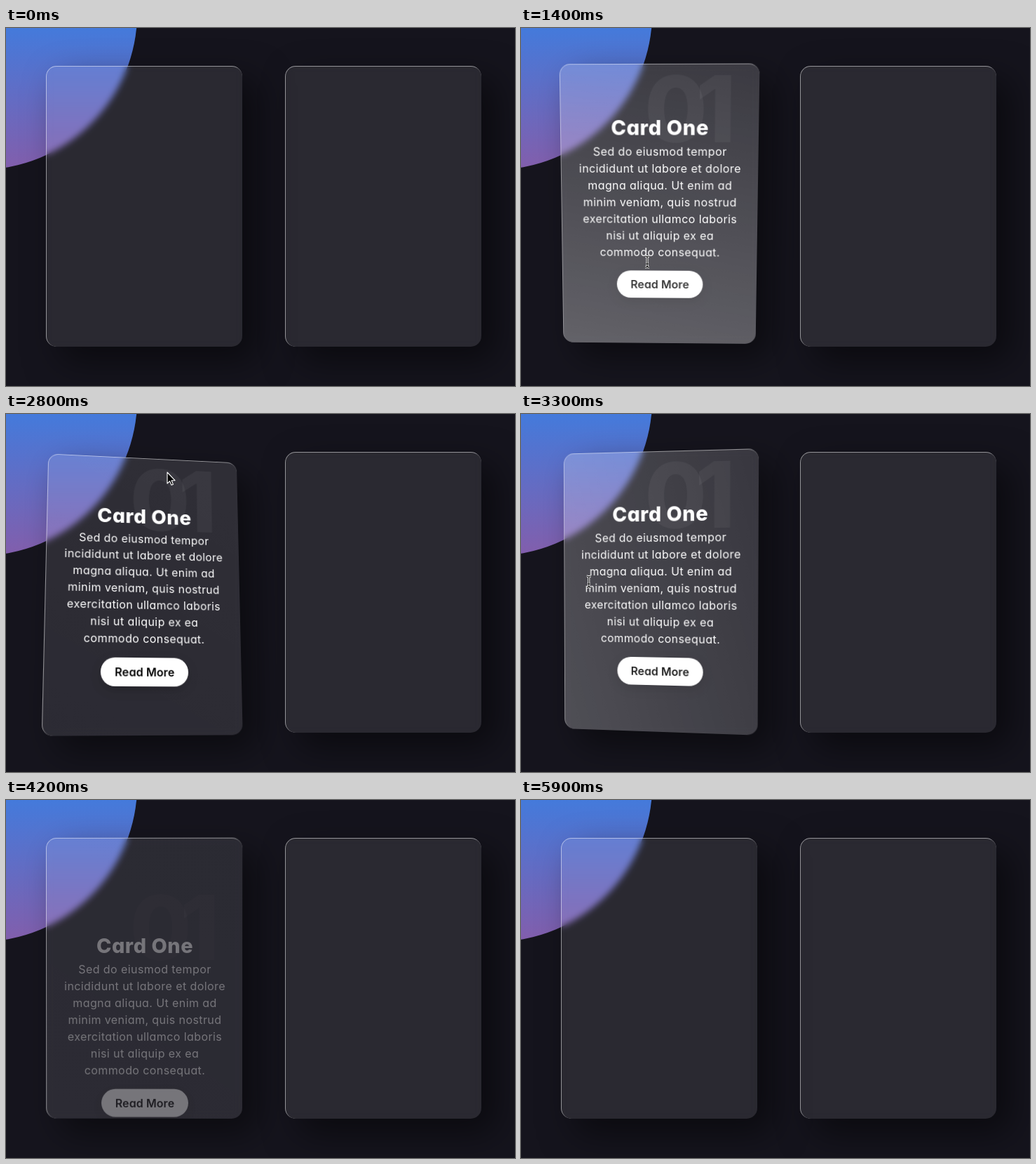
Write an HTML page that moves like this. It is 726 px wide and 510 px high and loops after 6000 ms.

```html
<!DOCTYPE html>
<html lang="en">
<head>
<meta charset="utf-8">
<title>Tilting glass cards</title>
<style>
  * { box-sizing: border-box; margin: 0; padding: 0; }
  html, body { width: 100%; height: 100%; overflow: hidden; background: #15141d; }
  #stage {
    position: relative; width: 726px; height: 510px; overflow: hidden;
    background: #15141d;
    font-family: Inter, "Open Sans", sans-serif;
    font-feature-settings: "cv11" 1; /* single-storey a */
    line-height: 1.5; color: #fff; text-align: center; cursor: none;
  }
  #disc { position: absolute; left: 0; top: 0; width: 726px; height: 510px; }
  .card {
    position: absolute; top: 54px; width: 280px; height: 400px;
    border-radius: 15px; overflow: hidden;
    background: rgba(255, 255, 255, .09);
    border-top: 1px solid rgba(255, 255, 255, .5);
    border-left: 1px solid rgba(255, 255, 255, .5);
    box-shadow: 20px 20px 50px rgba(0, 0, 0, .5);
    -webkit-backdrop-filter: blur(5px);
    backdrop-filter: blur(5px);
  }
  #one { left: 57px; }
  #two { left: 398px; }
  #content { position: absolute; left: 0; top: 46px; width: 280px; padding: 20px 0; opacity: 0; }
  h2 {
    position: absolute; top: -80px; right: 50px;
    font-size: 128px; font-weight: 800; letter-spacing: -.13em; color: rgba(255, 255, 255, .05);
  }
  h3 { position: relative; font-size: 28.8px; font-weight: 800; letter-spacing: .02em; }
  p { position: relative; font-size: 16px; font-weight: 400; letter-spacing: .026em; white-space: nowrap; }
  .button {
    position: relative; display: inline-block; margin-top: 15px; padding: 8px 20px;
    border-radius: 20px; background: #fff; color: #000;
    font-size: 16px; font-weight: 600; letter-spacing: .005em; white-space: nowrap;
    box-shadow: 0 5px 15px rgba(0, 0, 0, .2);
  }
  #glare {
    position: absolute; left: 50%; top: 50%; width: 800px; height: 800px;
    margin: -400px 0 0 -400px; opacity: 0;
    background: linear-gradient(0deg, rgba(255, 255, 255, 0), #fff);
  }
  #pointer { position: absolute; left: 0; top: 0; overflow: visible; }
</style>
</head>
<body>
<div id="stage">
  <svg id="disc" viewBox="0 0 726 510">
    <defs>
      <linearGradient id="sky" gradientUnits="userSpaceOnUse" x1="0" y1="0" x2="0" y2="200">
        <stop offset="0" stop-color="#447adb"/>
        <stop offset="1" stop-color="#825eac"/>
      </linearGradient>
    </defs>
    <circle cx="-37" cy="-22.6" r="224.3" fill="url(#sky)"/>
  </svg>
  <div class="card" id="one">
    <div id="content">
      <h2>01</h2>
      <h3>Card One</h3>
      <p>Sed do eiusmod tempor<br>incididunt ut labore et dolore<br>magna aliqua. Ut enim ad<br>minim veniam, quis nostrud<br>exercitation ullamco laboris<br>nisi ut aliquip ex ea<br>commodo consequat.</p>
      <span class="button">Read More</span>
    </div>
    <div id="glare"></div>
  </div>
  <div class="card" id="two"></div>
  <svg id="pointer" width="1" height="1">
    <path id="arrow" d="M0 0V16L3.6 12.7 6 18.2 8.4 17.2 6.1 11.7H11Z"
      fill="#000" stroke="#fff" stroke-width="1.1" stroke-linejoin="round"/>
    <g id="beam" fill="none">
      <path d="M-3-8Q0-8 0-6Q0-8 3-8M0-6V6M-3 8Q0 8 0 6Q0 8 3 8M-2 3H2" stroke="#fff" stroke-width="3"/>
      <path d="M-3-8Q0-8 0-6Q0-8 3-8M0-6V6M-3 8Q0 8 0 6Q0 8 3 8M-2 3H2" stroke="#000" stroke-width="1.1"/>
    </g>
  </svg>
</div>
<script>
const LOOP = 6000, STEP = 100;
const ENTER = 850, LEAVE = 3900, FADE = 500, GONE = 4000;

// time, x, y
const path = [
  [800, 128, 488], [1000, 118, 400], [1200, 132, 347], [1400, 180, 333],
  [1850, 252, 312], [2300, 293, 399], [2550, 285, 235], [2800, 230, 83],
  [3150, 118, 150], [3500, 82, 370], [3750, 80, 425], [3900, 15, 458]
];
// time, rotateX, rotateY, glare opacity
const tilt = [
  [ENTER, 0, 0, 0], [1050, -9, -4, .36], [1400, -6, -1.6, .34],
  [1850, -5, 5, .32], [2300, -11.5, 10.8, .43], [2550, -1, 11, .2],
  [2800, 9.5, 7.8, .03], [3150, 4, -6, .13], [3500, -9, -11, .38],
  [3800, -12, -12, .44], [LEAVE, -12, -12, .44]
];

const $ = id => document.getElementById(id);
const clamp = (v, lo = 0, hi = 1) => Math.min(hi, Math.max(lo, v));
const easeOut = u => 1 - (1 - u) ** 4;
const smooth = u => u * u * (3 - 2 * u);

// Slope at key i; flat at turning points so the curve never overshoots.
function slope(keys, i, k) {
  if (i < 1 || i > keys.length - 2) return 0;
  const [p, c, n] = [keys[i - 1], keys[i], keys[i + 1]];
  const a = (c[k] - p[k]) / (c[0] - p[0]), b = (n[k] - c[k]) / (n[0] - c[0]);
  return a * b <= 0 ? 0 : 2 * a * b / (a + b);
}

function sample(keys, t) {
  const last = keys.length - 1;
  t = clamp(t, keys[0][0], keys[last][0]);
  let i = 0;
  while (i < last - 1 && t > keys[i + 1][0]) i++;
  const a = keys[i], b = keys[i + 1], d = b[0] - a[0], u = (t - a[0]) / d;
  const h = smooth(u);
  return a.slice(1).map((v, j) => {
    const k = j + 1;
    return v + (b[k] - v) * h
      + d * u * (1 - u) * ((1 - u) * slope(keys, i, k) - u * slope(keys, i + 1, k));
  });
}

function drawCard(t) {
  const back = 1 - easeOut(clamp((t - LEAVE) / FADE));
  const [rx, ry, glow] = sample(tilt, t).map(v => v * back);
  const flat = Math.abs(rx) + Math.abs(ry) < .01;
  $('one').style.transform = flat ? 'none'
    : `perspective(1000px) rotateX(${rx}deg) rotateY(${ry}deg)`;

  // The glare faces the spot that is pressed down.
  const angle = flat ? Math.PI : Math.atan2(ry * 280, rx * 400);
  $('glare').style.transform = `rotate(${angle}rad)`;
  $('glare').style.opacity = glow;

  const shown = smooth(clamp((t - ENTER) / FADE)) * (1 - smooth(clamp((t - LEAVE) / FADE)));
  $('content').style.opacity = shown;
  $('content').style.transform = `translateY(${100 * (1 - shown)}px)`;
}

function drawPointer(t) {
  const [x, y] = sample(path, t);
  const onText = t > ENTER && x > 80 && x < 315 && y > 125 && y < 336;
  $('pointer').style.display = t >= path[0][0] && t < GONE ? 'block' : 'none';
  $('pointer').style.transform = `translate(${x}px, ${y}px)`;
  $('arrow').style.display = onText ? 'none' : 'inline';
  $('beam').style.display = onText ? 'inline' : 'none';
}

const start = performance.now();
function frame() {
  const t = Math.floor((performance.now() - start) % LOOP / STEP) * STEP;
  drawCard(t);
  drawPointer(t);
  requestAnimationFrame(frame);
}
frame();
</script>
</body>
</html>
```
